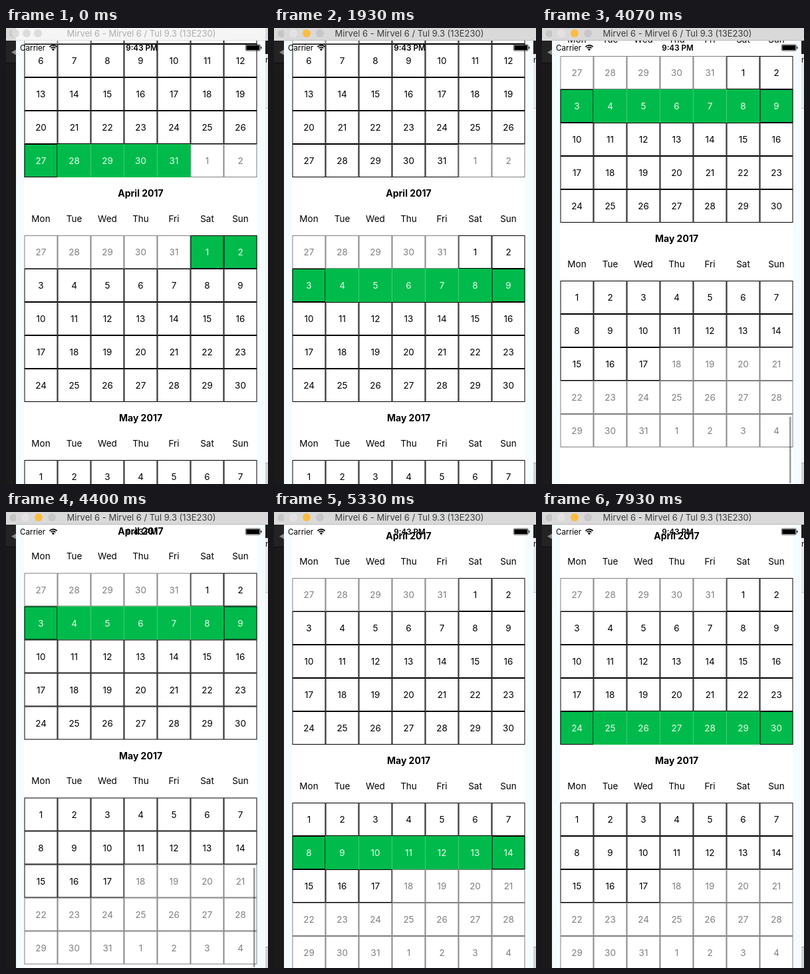
An HTML page with a canvas for the animation above (8 s loop, 394 px wide and 684 px high).

```html
<!DOCTYPE html>
<html lang="en">
<head>
<meta charset="utf-8">
<title>Week picker</title>
<style>
  html, body { margin: 0; width: 100%; height: 100%; overflow: hidden; background: #fff; }
  canvas { display: block; width: 394px; height: 684px; }
</style>
</head>
<body>
<canvas id="stage" width="394" height="684"></canvas>
<script>
const ctx = document.getElementById('stage').getContext('2d');
const LOOP = 8000, CELL = 50, LEFT = 27.5, PITCH = 337;
const FONT = 'Inter, Roboto, sans-serif';
const GREEN = '#00bb4b';
const WEEKDAYS = ['Mon', 'Tue', 'Wed', 'Thu', 'Fri', 'Sat', 'Sun'];
const DAY = 864e5;
const day = (month, date) => Date.UTC(2017, month - 1, date) / DAY;
const LAST_DAY = day(5, 17);

// "first" is the Monday that opens each five-week grid
const MONTHS = [
  { name: 'March 2017', number: 3, first: day(2, 27) },
  { name: 'April 2017', number: 4, first: day(3, 27) },
  { name: 'May 2017', number: 5, first: day(5, 1) }
];

// A tap selects the week that holds the pressed day
const TAPS = [
  { at: 1790, date: day(4, 6) },
  { at: 5100, date: day(5, 11) },
  { at: 5900, date: day(4, 26) },
  { at: 6800, date: day(4, 18) },
  { at: 7450, date: day(4, 26) }
];
const ACTIVATE = 1300;
const SCROLL_START = 3580, RELEASE = 4070;
const TOP_START = 311, TOP_END = 99, TOP_PULLED = 42;

const clamp = v => Math.max(0, Math.min(1, v));
const smooth = v => v * v * (3 - 2 * v);

function box(x, y, w, h, color) {
  ctx.fillStyle = color;
  ctx.fillRect(x, y, w, h);
}

function dot(x, y, r, color) {
  ctx.fillStyle = color;
  ctx.beginPath();
  ctx.arc(x, y, r, 0, Math.PI * 2);
  ctx.fill();
}

function label(text, x, y, size, weight = 400, color = '#000', align = 'center') {
  ctx.font = `${weight} ${size}px ${FONT}`;
  ctx.textAlign = align;
  ctx.fillStyle = color;
  ctx.fillText(text, x, y + size * 0.36);
}

// Top of the April grid: a drag past the end, then a damped spring back
function gridTop(t) {
  if (t < RELEASE) {
    const k = smooth(clamp((t - SCROLL_START) / (RELEASE - SCROLL_START)));
    return TOP_START + (TOP_PULLED - TOP_START) * k;
  }
  const w = (t - RELEASE) * 0.0107;
  return TOP_END + (TOP_PULLED - TOP_END) * (1 + w) * Math.exp(-w);
}

function weekStart(t) {
  let start = day(3, 27);
  for (const tap of TAPS) {
    if (t >= tap.at) start = tap.date - (tap.date - day(3, 27)) % 7;
  }
  return start;
}

function pressAlpha(t, date) {
  let alpha = 1;
  for (const tap of TAPS) {
    if (tap.date !== date) continue;
    const down = clamp((t - tap.at + 150) / 100);
    const left = 1 - clamp((t - tap.at) / 180);
    alpha = Math.min(alpha, 1 - 0.58 * down * left * left);
  }
  return alpha;
}

function drawCell(x, y, date, month, start, t) {
  const d = new Date(date * DAY);
  const inMonth = d.getUTCMonth() + 1 === month;
  const enabled = inMonth && date <= LAST_DAY;
  const picked = enabled && date >= start && date < start + 7;
  const edge = date === start || date === start + 6 || d.getUTCDate() === 1;

  ctx.globalAlpha = enabled ? pressAlpha(t, date) : 0.5;
  if (picked) box(x, y, CELL, CELL, GREEN);
  if (!picked || edge) {
    ctx.strokeStyle = '#000';
    ctx.lineWidth = 1;
    ctx.strokeRect(x + 0.5, y + 0.5, CELL - 1, CELL - 1);
  }
  label(d.getUTCDate(), x + 25, y + 25.5, 13.5, 400, picked ? '#e9fbef' : '#000');
  ctx.globalAlpha = 1;
}

function drawMonth(month, top, start, t) {
  label(month.name, 202.5, top - 63, 14, 700);
  WEEKDAYS.forEach((name, i) => label(name, LEFT + 25 + i * CELL, top - 25, 13.5));
  for (let i = 0; i < 35; i++) {
    const x = LEFT + (i % 7) * CELL;
    const y = top + Math.floor(i / 7) * CELL;
    if (y > -CELL && y < 684) drawCell(x, y, month.first + i, month.number, start, t);
  }
}

function drawScrollbar(t, top) {
  const alpha = clamp((t - SCROLL_START) / 80) * (1 - clamp((t - 4750) / 250));
  if (!alpha) return;
  const over = Math.max(0, TOP_END - top);
  const before = Math.max(0, top - TOP_END);
  const size = 157 - over;
  ctx.globalAlpha = alpha * 0.4;
  ctx.fillStyle = '#000';
  ctx.beginPath();
  ctx.roundRect(372, 683 - size - before * 0.235, 2.5, size, 1.25);
  ctx.fill();
  ctx.globalAlpha = 1;
}

function drawStatus() {
  label('Carrier', 21, 29.5, 11.7, 400, '#000', 'left');
  label('9:43 PM', 204, 29.5, 11.7, 600);
  ctx.strokeStyle = '#000';
  ctx.lineWidth = 1.7;
  for (const r of [4.6, 7.6]) {
    ctx.beginPath();
    ctx.arc(71, 33.5, r, -Math.PI * 0.76, -Math.PI * 0.24);
    ctx.stroke();
  }
  dot(71, 32.2, 1.6, '#000');
  ctx.lineWidth = 0.6;
  ctx.beginPath();
  ctx.roundRect(360.3, 24.8, 22, 9.4, 1.8);
  ctx.stroke();
  box(361.3, 25.8, 20, 7.4, '#000');
  box(383.2, 27.8, 1.2, 3.4, '#000');
}

function drawBackdrop() {
  box(0, 0, 394, 19, '#d9d9d9');
  dot(11, 8.5, 5.5, '#c6c6c6');
  box(0, 19, 15, 34, '#242324');
  box(0, 53, 15, 631, '#1b1a1b');
  box(0, 52, 15, 1, '#0c0c0c');
  ctx.fillStyle = '#8a8a8a';
  ctx.beginPath();
  ctx.moveTo(8, 36.5);
  ctx.lineTo(15, 32.5);
  ctx.lineTo(15, 40.5);
  ctx.fill();

  box(390, 19, 4, 20, '#1c1c1c');
  box(390, 39, 4, 645, '#f4f4f4');
  box(390, 39, 4, 82, '#e9e9e9');
  box(390, 120, 4, 1, '#bdbdbd');
  box(390, 652, 4, 32, '#d4d4d4');
  box(390, 652, 4, 1, '#a8a8a8');
  label('n', 390, 48, 12, 400, '#111', 'left');
}

function drawTitle(active) {
  box(15, 0, 375, 19, active ? '#dad9da' : '#f5f5f5');
  box(15, 18, 375, 1, active ? '#bcbbbc' : '#dedede');
  const lights = active ? ['#e6e2e3', '#fdbc40', '#c8c6c8'] : ['#dcdcdc', '#dcdcdc', '#dcdcdc'];
  const gap = active ? 20 : 17;
  const last = active ? 69 : 48;
  lights.forEach((color, i) => dot(last - (2 - i) * gap, 8, 6, color));
  label('Mirvel 6 - Mirvel 6 / Tul 9.3 (13E230)', 203.5, 8.7, 13, 400, active ? '#3c3b3c' : '#adadad');
}

function draw(t) {
  const top = gridTop(t);
  const start = weekStart(t);
  drawBackdrop();
  box(15, 19, 375, 665, '#f5fcff');
  box(LEFT, 19, 350, 665, '#fff');

  ctx.save();
  ctx.beginPath();
  ctx.rect(15, 19, 375, 665);
  ctx.clip();
  MONTHS.forEach((month, i) => drawMonth(month, top + (i - 1) * PITCH, start, t));
  drawScrollbar(t, top);
  drawStatus();
  ctx.restore();

  drawTitle(t >= ACTIVATE);
}

const begin = performance.now();
function frame() {
  draw((performance.now() - begin) % LOOP);
  requestAnimationFrame(frame);
}
frame();
</script>
</body>
</html>
```
